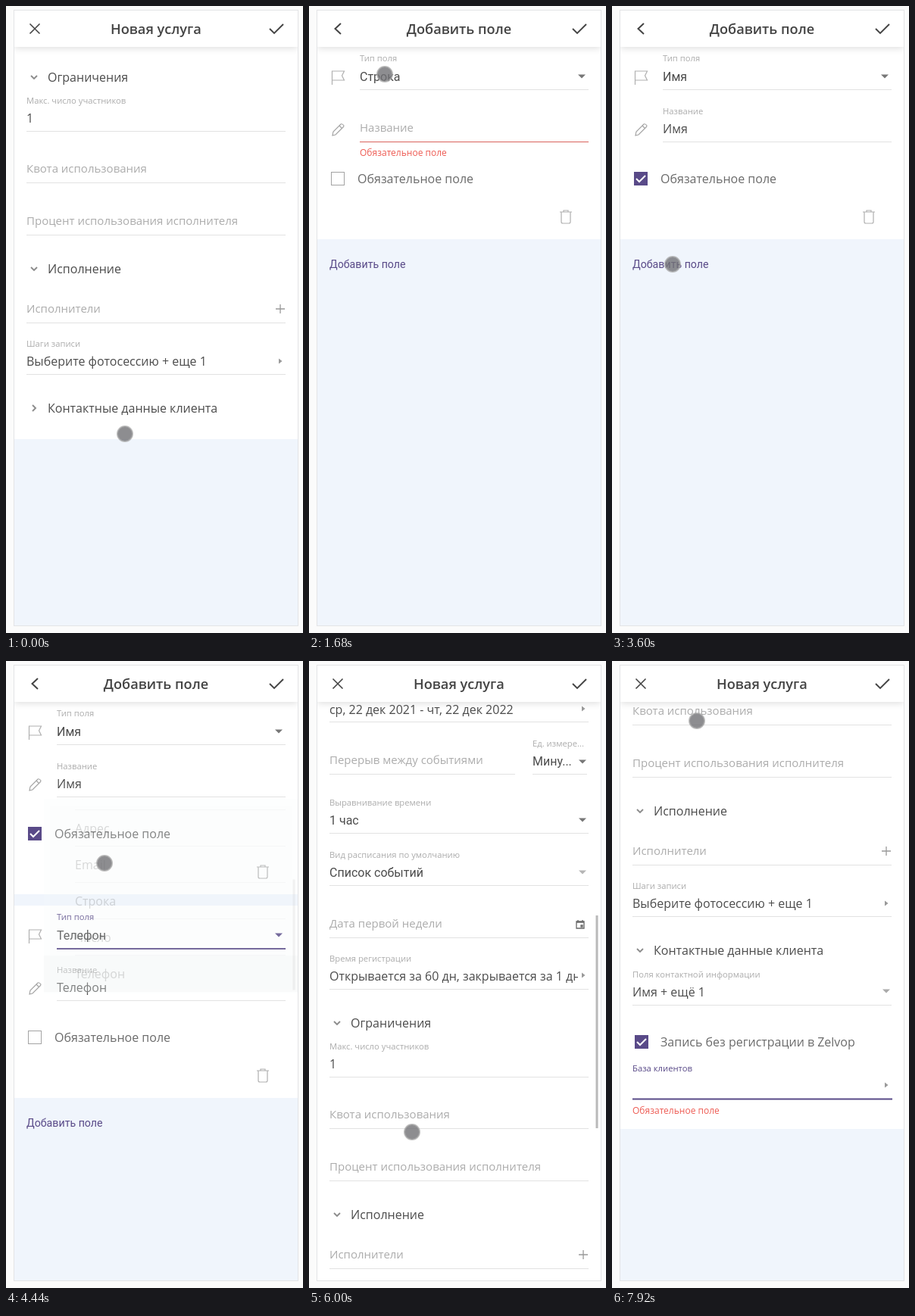
These frames come from a looping animation (392x828 px, 8 s). An HTML page with a canvas:

```html
<!DOCTYPE html>
<html lang="ru">
<head>
<meta charset="utf-8">
<style>
  html, body { margin: 0; width: 100%; height: 100%; overflow: hidden; background: #fbfbfb; }
  canvas { display: block; width: 392px; height: 828px; }
</style>
</head>
<body>
<canvas></canvas>
<script>
const W = 392, H = 828, LOOP = 8000;
const canvas = document.querySelector('canvas');
const ctx = canvas.getContext('2d');
const dpr = window.devicePixelRatio || 1;
canvas.width = W * dpr;
canvas.height = H * dpr;

const SANS = '"Open Sans", "Noto Sans", sans-serif', ROBOTO = 'Roboto, sans-serif';
const INK = '#4c4c4c', HINT = '#acacac', RULE = '#e2e2e2', ICON = '#8c8c8c';
const PURPLE = '#594a88', RED = '#ee5c54', BLUE = '#f0f5fc';
const OPTIONS = ['Имя', 'ФИО', 'Организация', 'Должность', 'Адрес', 'Email', 'Строка', 'Число', 'Телефон'];

const clamp = v => Math.max(0, Math.min(1, v));
const ease = p => p * p * (3 - 2 * p);
const ramp = (t, from, to) => clamp((t - from) / (to - from));
// Shows between two times with a short fade at either end.
const fade = (t, from, to, out = 180) => ramp(t, from, from + 120) * (1 - ramp(t, to, to + out));

// Each key is [time, ...values]; values are eased from key to key.
function track(keys, t) {
  const i = keys.findIndex(k => k[0] > t);
  if (i === 0) return keys[0].slice(1);
  if (i < 0) return keys[keys.length - 1].slice(1);
  const a = keys[i - 1], b = keys[i], p = ease(ramp(t, a[0], b[0]));
  return a.slice(1).map((v, n) => v + (b[n + 1] - v) * p);
}

const POINTER = [
  [120, 157, 565], [340, 145, 533], [480, 145, 533], [820, 130, 440], [1060, 130, 437],
  [1450, 100, 88], [1680, 100, 90], [1900, 100, 93], [2150, 124, 170], [2600, 126, 113],
  [2880, 126, 110], [3200, 40, 228], [3340, 40, 228], [3520, 80, 341], [3640, 80, 341],
  [3850, 130, 362], [4000, 130, 362], [4230, 130, 408], [4310, 130, 408], [4440, 130, 267],
  [5040, 357, 37], [5280, 357, 34], [5480, 357, 34], [5720, 142, 600], [6000, 136, 622],
  [6360, 128, 687], [6960, 40, 503], [7320, 40, 503], [7900, 112, 79]
];
const FORM_SCROLL = [[460, 347], [800, 198], [5480, 198], [5481, 731], [6000, 731], [6360, 205], [6480, 198]];

function text(str, x, y, { size = 16, color = INK, weight = 400, font = SANS, align = 'left' } = {}) {
  ctx.font = `${weight} ${size}px ${font}`;
  ctx.fillStyle = color;
  ctx.textAlign = align;
  ctx.fillText(str, x, y + size * 0.36);
}

function box(x, y, w, h, color) {
  ctx.fillStyle = color;
  ctx.fillRect(x, y, w, h);
}

function path(d, x, y, color, width = 1.5, fill = false) {
  ctx.save();
  ctx.translate(x, y);
  ctx.lineWidth = width;
  ctx.strokeStyle = ctx.fillStyle = color;
  ctx[fill ? 'fill' : 'stroke'](new Path2D(d));
  ctx.restore();
}

const label = (s, x, y, color = HINT) => text(s, x, y, { size: 11.25, color });
const hint = (s, x, y) => text(s, x, y, { size: 15, color: HINT });
const rule = (x, y, x2 = 369, color = RULE, h = 1) => box(x, y, x2 - x, h, color);
const arrowDown = (x, y, color = '#777') => path('M-5-2.5H5L0 2.5Z', x, y, color, 1, true);
const arrowRight = y => path('M-2-3.5L2.5 0L-2 3.5Z', 362, y, '#999', 1, true);

function field(name, value, y, { x = 27, x2 = 369, font = SANS } = {}) {
  label(name, x, y - 40);
  text(value, x, y - 17, { font });
  rule(x, y, x2);
}

function emptyField(name, y, x2) {
  hint(name, 27, y - 18);
  rule(27, y, x2);
}

function section(name, y, open = true) {
  path(open ? 'M-4-2L0 2L4-2' : 'M-2-4L2 0L-2 4', 37, y, ICON, 1.9);
  text(name, 55, y);
}

function checkbox(x, y, checked, name) {
  if (checked) {
    box(x, y - 9, 18, 18, PURPLE);
    path('M-6 0L-2 4L6-4', x + 9, y, '#fff', 2);
  } else {
    ctx.lineWidth = 1;
    ctx.strokeStyle = '#a3a3a3';
    ctx.strokeRect(x + 0.5, y - 8.5, 17, 17);
  }
  text(name, 64, y, { color: '#6b6b6b' });
}

function scrollbar(y, h, alpha) {
  ctx.save();
  ctx.globalAlpha *= alpha;
  box(378.5, y, 3, h, '#b9b9b9');
  ctx.restore();
}

function drawForm(t) {
  const [y] = track(FORM_SCROLL, t);
  const open = t >= 400, filled = t >= 5480, guest = t >= 7300;
  const end = y + (guest ? 420 : open ? 352 : 225);
  box(11, 54, 374, end - 54, '#fff');

  text('ср, 22 дек 2021 - чт, 22 дек 2022', 27, y - 667);
  arrowRight(y - 668);
  rule(27, y - 651);
  emptyField('Перерыв между событиями', y - 582, 272);
  field('Ед. измере...', 'Мину...', y - 582, { x: 295, x2: 367, font: ROBOTO });
  arrowDown(361, y - 598);
  field('Выравнивание времени', '1 час', y - 504, { font: ROBOTO });
  arrowDown(361, y - 521);
  field('Вид расписания по умолчанию', 'Список событий', y - 435, { font: ROBOTO });
  arrowDown(361, y - 452, '#b5b5b5');
  emptyField('Дата первой недели', y - 366);
  path('M-5-4H5V5H-5ZM-5-3H5M-3-6V-4M3-6V-4M1 1H3V3H1Z', 358, y - 383, '#666', 1.3);
  ctx.save();
  ctx.beginPath();
  ctx.rect(0, 0, 355, H);
  ctx.clip();
  field('Время регистрации', 'Открывается за 60 дн, закрывается за 1 дн', y - 298);
  ctx.restore();
  rule(355, y - 298);
  arrowRight(y - 316);

  section('Ограничения', y - 253);
  field('Макс. число участников', '1', y - 182);
  emptyField('Квота использования', y - 114);
  emptyField('Процент использования исполнителя', y - 45);
  section('Исполнение', y);
  emptyField('Исполнители', y + 71);
  path('M-6 0H6M0-6V6', 362, y + 53, '#999', 1.3);
  field('Шаги записи', 'Выберите фотосессию + еще 1', y + 139);
  arrowRight(y + 122);

  section('Контактные данные клиента', y + 184, open);
  if (open) {
    if (filled) field('Поля контактной информации', 'Имя + ещё 1', y + 256);
    else emptyField('Поля контактной информации', y + 256);
    arrowDown(362, y + 238, '#aaa');
    checkbox(30, y + 305, guest, 'Запись без регистрации в Zelvop');
  }
  if (guest) {
    label('База клиентов', 27, y + 340, PURPLE);
    arrowRight(y + 362);
    rule(27, y + 379.5, 370, PURPLE, 2);
    text('Обязательное поле', 27, y + 396, { size: 12, color: RED });
  }
  const shown = Math.max(fade(t, 440, 860), fade(t, 5760, 6800));
  scrollbar(336 + (731 - y) * 0.3688, 281, shown);
}

function fieldBlock(y, { type, name, required, active }) {
  box(11, y, 374, 254, '#fff');
  label('Тип поля', 67, y + 15, active ? PURPLE : HINT);
  text(type, 67, y + 39, { font: ROBOTO });
  rule(67, y + 56, 369, active ? PURPLE : RULE, active ? 2 : 1);
  arrowDown(360, y + 39, active ? PURPLE : '#777');
  path('M-7.5 10V-8H8.5L5.5-2L8.5 4H-7.5', 38, y + 40, '#b0b0b0', 1.2);
  path('M-7 8L-6 3L4-7Q6-8 8-5Q8-4 7-3L-3 7ZM2-5L5-2', 38, y + 109, '#a3a3a3', 1.2);
  if (name) {
    field('Название', name, y + 125, { x: 67 });
  } else {
    hint('Название', 67, y + 107);
    rule(67, y + 125, 369, '#d9625c');
    text('Обязательное поле', 67, y + 140, { size: 12, color: RED });
  }
  checkbox(29, y + 174, required, 'Обязательное поле');
  path('M-8-6H8M-3-6V-8H3V-6M-6-6V7Q-6 9-4 9H4Q6 9 6 7V-6', 339, y + 224, '#b0b0b0', 1.2);
}

function menu(top, scroll, alpha, selected) {
  if (!alpha) return;
  const height = 257;
  ctx.save();
  ctx.globalAlpha = alpha;
  // The shadow fades faster than the panel so it does not show through it.
  ctx.shadowColor = `rgba(0,0,0,${0.4 * alpha ** 2})`;
  ctx.shadowBlur = 7;
  ctx.shadowOffsetY = 2;
  box(50, top, 335, height, '#f4f6f8');
  ctx.shadowColor = 'transparent';
  ctx.beginPath();
  ctx.rect(50, top, 335, height);
  ctx.clip();
  OPTIONS.forEach((option, i) => {
    const y = top + 1 + i * 48 - scroll;
    if (option === selected) box(50, y, 335, 48, '#e3e5e7');
    text(option, 91, y + 24, { color: '#333' });
    if (i < OPTIONS.length - 1) rule(91, y + 47, 369, '#d2d4d6');
  });
  scrollbar(top + 5 + scroll * 0.57, 146, 1);
  ctx.restore();
}

function drawFields(t) {
  const named = t >= 2900, second = t >= 3620, phone = t >= 4310;
  let end = 54;
  if (t >= 1500) {
    fieldBlock(54, {
      type: named ? 'Имя' : 'Строка', name: named && 'Имя',
      required: t >= 3260, active: t >= 1900 && t < 3260
    });
    end = 308;
  }
  if (second) {
    fieldBlock(323, {
      type: phone ? 'Телефон' : 'Строка', name: phone && 'Телефон',
      required: false, active: t >= 3960
    });
    end = 577;
  }
  text('Добавить поле', 27, end + 33, { size: 14.2, font: ROBOTO, color: PURPLE });
  const maxScroll = 178;
  menu(83, maxScroll * (1 - ease(ramp(t, 2200, 2560))), fade(t, 1900, 2900), t < 2500 ? 'Строка' : '');
  menu(182, maxScroll, fade(t, 3960, 4310, 160), phone ? 'Телефон' : 'Строка');
}

function drawHeader(form) {
  ctx.save();
  ctx.shadowColor = 'rgba(0,0,0,.13)';
  ctx.shadowBlur = 9;
  ctx.shadowOffsetY = 2;
  box(11, 6, 374, 48, '#fff');
  ctx.restore();
  path(form ? 'M-6.5-6.5L6.5 6.5M6.5-6.5L-6.5 6.5' : 'M4-7L-3.5 0L4 7', 38, 30, '#444', form ? 1.6 : 2);
  path('M-9 0L-3 6L9-6', 357, 30, '#444', 1.9);
  text(form ? 'Новая услуга' : 'Добавить поле', 198, 30.8, { size: 18.2, weight: 600, color: '#444', align: 'center' });
}

function drawPointer(t) {
  const [x, y] = track(POINTER, t);
  ctx.beginPath();
  ctx.arc(x, y, 10, 0, 2 * Math.PI);
  ctx.fillStyle = 'rgba(112,112,116,.8)';
  ctx.fill();
  ctx.lineWidth = 2;
  ctx.strokeStyle = 'rgba(165,165,165,.7)';
  ctx.stroke();
}

function draw(t) {
  const form = t < 1080 || t >= 5480;
  ctx.setTransform(dpr, 0, 0, dpr, 0, 0);
  box(0, 0, W, H, '#fbfbfb');
  ctx.save();
  ctx.beginPath();
  ctx.rect(10, 6, 376, 813);
  ctx.clip();
  box(10, 6, 376, 813, BLUE);
  (form ? drawForm : drawFields)(t);
  drawHeader(form);
  ctx.restore();
  ctx.lineWidth = 1;
  ctx.strokeStyle = '#e3e4e6';
  ctx.strokeRect(10.5, 5.5, 375, 813);
  drawPointer(t);
}

const start = performance.now();
function tick() {
  draw((performance.now() - start) % LOOP);
  requestAnimationFrame(tick);
}
tick();
</script>
</body>
</html>
```
